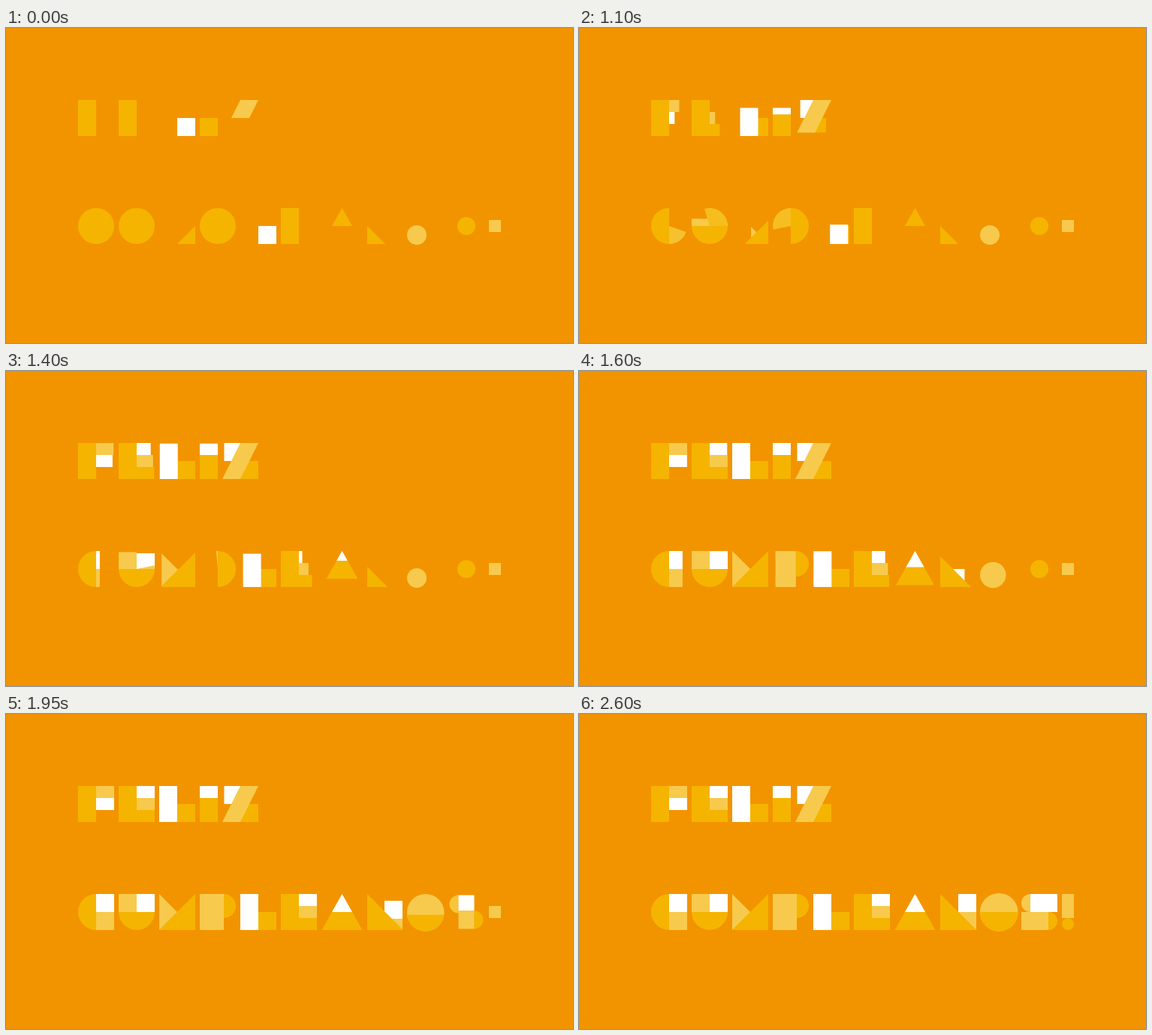
Animation of 755x420 px, one loop 3050 ms. Source, as an HTML page with a canvas:

```html
<!DOCTYPE html>
<html lang="es">
<head>
<meta charset="utf-8">
<title>Feliz cumpleaños</title>
<style>
  html, body { margin: 0; width: 100%; height: 100%; overflow: hidden; background: #f29400; }
  canvas { display: block; }
</style>
</head>
<body>
<canvas id="stage" width="755" height="420"></canvas>
<script>
const ctx = document.getElementById('stage').getContext('2d');
const LOOP = 3050, HOLD = 1000, STEP = 50, LAST = 32;
const BACK = '#f29400', YELLOW = '#f5b400', LIGHT = '#f7ca4d', WHITE = '#fff';
const DEG = Math.PI / 180;
let step = 0;

// Eased progress of a part; start and length are counted in steps.
function ease(start, length = 13.6) {
  const x = Math.min(1, Math.max(0, (step - start) / length));
  return 1 - (1 - x) ** 3;
}

const mix = (a, b, p) => a + (b - a) * p;

function fade(p) {
  return `rgb(${mix(245, 247, p)},${mix(180, 202, p)},${mix(0, 77, p)})`;
}

function box(color, left, top, right, bottom) {
  ctx.fillStyle = color;
  if (right > left && bottom > top) ctx.fillRect(left, top, right - left, bottom - top);
}

function poly(color, ...points) {
  ctx.fillStyle = color;
  ctx.beginPath();
  points.forEach(([x, y]) => ctx.lineTo(x, y));
  ctx.fill();
}

function pie(color, x, y, r, from = 0, to = 360) {
  if (to <= from) return;
  ctx.fillStyle = color;
  ctx.beginPath();
  if (to - from < 360) ctx.moveTo(x, y);
  ctx.arc(x, y, r, from * DEG, to * DEG);
  ctx.fill();
}

function letterF(x, y) {
  box(YELLOW, x, y, x + 24, y + 48);
  box(LIGHT, x + 24, y, x + 24 + 24 * ease(-1.27), y + 16);
  box(WHITE, x + 24, y + 16, x + 24 + 24 * ease(0.45), y + 32);
}

function letterE(x, y, start) {
  box(YELLOW, x, y, x + 24, y + 48);
  const arm = (color, top, delay) =>
    box(color, x + 24, y + top, x + 24 + 24 * ease(start + delay), y + top + 16);
  arm(YELLOW, 32, 0);
  arm(LIGHT, 16, 1.75);
  arm(WHITE, 0, 3.9);
}

function letterL(x, y, start) {
  const d = 24 * ease(start);
  box(YELLOW, x + 24, y + 24, x + 48, y + 48);
  box(WHITE, x + 24 - d, y + 24 - d, x + 48 - d, y + 48);
}

function letterI() {
  const p = ease(-1.27), split = 120 - 8 * p;
  box(WHITE, 258, 120 - 24 * p, 282, split);
  box(YELLOW, 258, split, 282, 144);
}

function letterZ() {
  const p = ease(-1.18, 7.5), low = 120 + 24 * p;
  box(WHITE, 312 - 21.5 * p, 96, 312, 120);
  box(YELLOW, 312, 120, 312 + 24 * ease(0, 6), low);
  poly(LIGHT, [312, 96], [336, 96], [324 - 12 * p, low], [300 - 12 * p, low]);
}

function letterC() {
  const p = ease(-0.6, 9.7), right = 120 + 24 * ease(7);
  pie(YELLOW, 120, 264, 24, 90, 270);
  pie(fade(p), 120, 264, 24, -90 + 180 * p, 90);
  box(WHITE, 120, 240, right, 264);
  box(LIGHT, 120, 264, right, 288);
}

function letterU() {
  const p = ease(-0.15, 13.5);
  pie(YELLOW, 174, 264, 24, 0, 180);
  box(LIGHT, 150, 264 - 24 * p, 174, 264);
  box(WHITE, 174, 264 - 24 * ease(1.4, 13.2), 198, 264);
  pie(fade(p), 174, 264, 24, 180 + 180 * p, 360);
}

function letterM() {
  const p = ease(0.45), size = 24 + 24 * p;
  const x = 252 - size / 2, y = 288 - size / 2, d = 24 * p;
  poly(YELLOW, [252 - size, 288], [252, 288 - size], [252, 288]);
  poly(LIGHT, [x, y], [x - d, y - d], [x - d, y + d]);
}

function letterP() {
  const p = ease(0, 11.5), q = ease(8, 8.5), x = 282 + 8 * q;
  pie(YELLOW, x, 264 - 8 * q, 24 - 8 * q, -90, 90);
  pie(fade(p), 282, 264, 24, 90 + 180 * p, 270);
  box(LIGHT, x - 32 * q, 240, x, 288);
}

function letterA() {
  const p = ease(4.9);
  const peak = (color, h) =>
    poly(color, [447.5, 240], [447.5 + h * 0.5625, 240 + h], [447.5 - h * 0.5625, 240 + h]);
  peak(YELLOW, 24 + 24 * p);
  if (p) peak(WHITE, 24 * p);
}

function letterN() {
  const size = 24 + 24 * ease(7.4);
  const x = 481 + 24 * ease(10.2), y = 264 - 24 * ease(15.2);
  if (x > 481) {
    poly(LIGHT, [x, 264], [x + 24, 264], [x + 24, 288]);
    box(WHITE, x, y, x + 24, y + 24);
  }
  poly(YELLOW, [481, 288 - size], [481 + size, 288], [481, 288]);
}

function letterO() {
  const p = ease(10.2), q = ease(12.6);
  const x = 547 + 12.2 * p, y = 276 - 11.7 * p, r = 13 + 12.4 * p;
  pie(LIGHT, x, y, r);
  if (!q) return;
  const split = Math.max(-1, Math.min(1, (290 - 26 * q - y) / r));
  const a = Math.asin(split);
  ctx.fillStyle = YELLOW;
  ctx.beginPath();
  ctx.arc(x, y, r, a, Math.PI - a);
  ctx.fill();
}

function letterS() {
  const d = 12 * ease(12.2), wide = 12 * ease(24, 8);
  const left = 613 - d, right = 613 + d, middle = 252 + d;
  pie(fade(ease(16, 8)), left, 264 - d, 12, 90, 270);
  pie(YELLOW, right, 264 + d, 12, -90, 90);
  box(WHITE, left, 252 - d, right + wide, middle);
  box(LIGHT, left - wide, middle, right, 276 + d);
}

function exclamation() {
  const d = 16 * ease(19);
  pie(YELLOW, 651, 264 + d, 8);
  box(LIGHT, 643, 256 - d, 659, 272);
}

function draw(ms) {
  step = ms < HOLD ? -9 : Math.min(LAST, Math.floor((ms - HOLD) / STEP));
  box(BACK, 0, 0, 755, 420);

  letterF(96, 96);
  letterE(150, 96, -1.27);
  letterL(204, 96, -1.27);
  letterI();
  letterZ();

  letterC();
  letterU();
  letterM();
  letterP();
  letterL(312, 240, 1.65);
  letterE(366, 240, 3.2);
  letterA();
  letterN();
  letterO();
  letterS();
  exclamation();
}

const begin = performance.now();
function tick() {
  draw((performance.now() - begin) % LOOP);
  requestAnimationFrame(tick);
}
tick();
</script>
</body>
</html>
```
